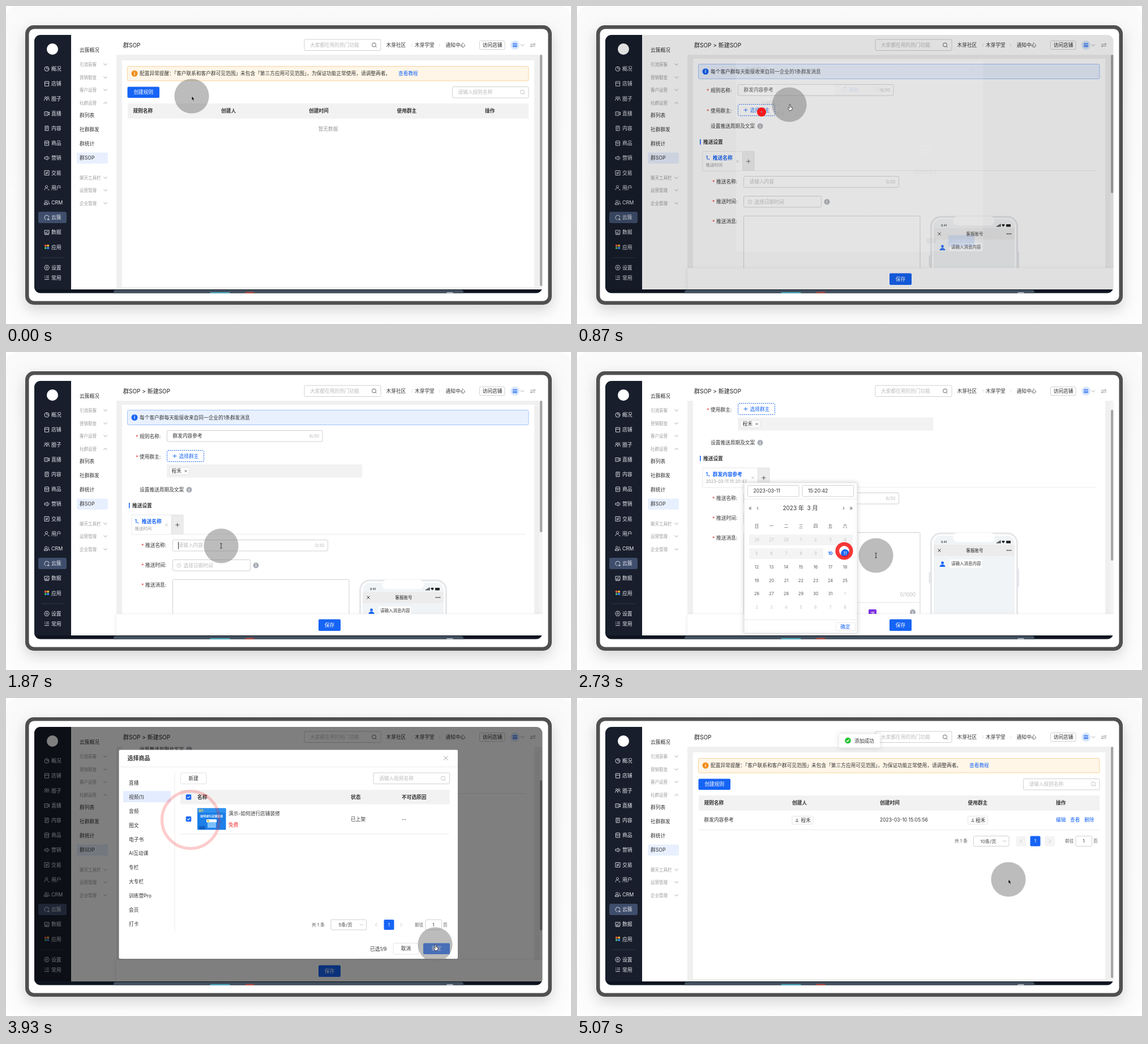
Recreate the animation shown at these times as an HTML page with a canvas. Size 998 by 561 pixels, loop 5270 ms.

```html
<!DOCTYPE html>
<html lang="zh-CN">
<head>
<meta charset="utf-8">
<title>群SOP</title>
<style>
html, body { margin: 0; width: 100%; height: 100%; overflow: hidden; background: #fff; }
canvas { display: block; width: 998px; height: 561px; }
</style>
</head>
<body>
<canvas id="stage"></canvas>
<script>
const W = 998, H = 561, LOOP = 5270, STEP = 1000 / 15, LAST = 76;
const INK = '#333', GREY = '#999', PALE = '#bbb', RULE = '#dcdcdc', BLUE = '#1664f5', RED = '#f02a2a';
const FONT = 'Inter, "Noto Sans CJK SC", "Noto Sans CJK", sans-serif';
const OWNER = '程禾', NAME = '群发内容参考', STAMP = '2023-03-11 15:20:42', VIDEO = '演示-如何进行店铺装修';

const canvas = document.getElementById('stage');
const c = canvas.getContext('2d');
const dpr = window.devicePixelRatio || 1;
canvas.width = W * dpr;
canvas.height = H * dpr;

// Motion tables: [step, value...]
const CURSOR = [
  [0, 328, 159], [3, 246, 156], [5, 246, 156], [8, 380, 150], [10, 380, 150], [12, 326, 187],
  [13, 375, 174], [15, 430, 190], [16, 430, 190], [19, 679, 414], [21, 679, 414], [26, 380, 342],
  [32, 380, 342], [36, 360, 293], [37, 360, 293], [39, 472, 351], [41, 528, 359], [45, 528, 359],
  [48, 322, 391], [49, 322, 391], [52, 326, 215], [53, 326, 215], [58, 758, 435], [61, 758, 435],
  [65, 579, 478], [68, 614, 338], [73, 740, 322], [76, 762, 320]];
const CLICKS = [[4, 246, 156], [12, 326, 187], [20, 679, 414], [39, 472, 351], [52, 326, 215], [60, 758, 435], [65, 579, 478]];
const SCROLL = [[33, 0], [35, 83], [45, 83], [47, 153], [62, 153], [64, 299]];
const THUMB = [[21, 86, 330], [22, 86, 318], [33, 86, 318], [35, 102, 368], [45, 102, 368], [47, 145, 410], [62, 145, 410], [64, 231, 462]];
const OWNER_SHADE = [[12, 0], [13, .24], [15, 1], [21, 1], [24, 0]];
const GOODS_SHADE = [[48, 0], [51, 1], [60, 1], [62, 0]];
const FADE = [[65, 0], [68, .88], [69, 1]];

function at(k, keys) {
  if (k <= keys[0][0]) return keys[0].slice(1);
  for (let i = 1; i < keys.length; i++) {
    const a = keys[i - 1], b = keys[i];
    if (k > b[0]) continue;
    const p = (k - a[0]) / (b[0] - a[0]), e = p * p * (3 - 2 * p);
    return a.slice(1).map((v, j) => v + (b[j + 1] - v) * e);
  }
  return keys[keys.length - 1].slice(1);
}
const typed = (k, from) => NAME.slice(0, Math.max(0, Math.min(6, (k - from) * 2)));

function txt(s, x, y, color = INK, size = 8.7, align = 'left', weight = 400) {
  c.font = `${weight} ${size}px ${FONT}`;
  c.textAlign = align;
  c.fillStyle = color;
  c.fillText(s, x, y + size * .37);
}
const mid = (s, x, y, color, size, weight) => txt(s, x, y, color, size, 'center', weight);
const bold = (s, x, y, color, size) => txt(s, x, y, color, size, 'left', 600);

function box(x, y, x2, y2, fill, stroke, r = 2, lw = .8) {
  c.beginPath();
  c.roundRect(x, y, x2 - x, y2 - y, r);
  if (fill) { c.fillStyle = fill; c.fill(); }
  if (stroke) { c.strokeStyle = stroke; c.lineWidth = lw; c.stroke(); }
}
function dot(x, y, r, fill) {
  c.beginPath();
  c.arc(x, y, r, 0, 7);
  c.fillStyle = fill;
  c.fill();
}
function path(d, x, y, color, lw = .9, fill, scale = 1) {
  c.save();
  c.translate(x, y);
  c.scale(scale, scale);
  const p = new Path2D(d);
  if (fill) { c.fillStyle = fill; c.fill(p); }
  if (color) { c.strokeStyle = color; c.lineWidth = lw; c.stroke(p); }
  c.restore();
}
const hline = (x, x2, y, color = '#e8e8e8') => path(`M${x} ${y}H${x2}`, 0, 0, color, .8);
const chevron = (x, y, up, color = GREY) => path(up ? 'M-3 1.5L0-1.5L3 1.5' : 'M-3-1.5L0 1.5L3-1.5', x, y, color);
const cross = (x, y, s, color = GREY) => path(`M${-s} ${-s}L${s} ${s}M${s} ${-s}L${-s} ${s}`, x, y, color);
const lens = (x, y, color = PALE) => path('M3-.5A3.5 3.5 0 1 1-4-.5A3.5 3.5 0 1 1 3-.5M2 2.2L4 4.2', x, y, color);
const person = (x, y, s, color) => path('M0-4a2.2 2.2 0 1 0 .1 0M-4.5 4.5C-4.5-.2 4.5-.2 4.5 4.5Z', x, y, null, 0, color, s);
function button(s, x, y, x2, y2, primary) {
  box(x, y, x2, y2, primary ? BLUE : '#fff', primary ? null : RULE);
  mid(s, (x + x2) / 2, (y + y2) / 2, primary ? '#fff' : INK);
}
function info(x, y, r, color) {
  dot(x, y, r, color);
  mid('i', x, y, '#fff', r * 1.4, 700);
}
function input(x, y, x2, y2, hint, value, count) {
  box(x, y, x2, y2, '#fff', '#c4c4c4');
  txt(value || hint, x + 10, (y + y2) / 2, value ? INK : PALE);
  if (count) txt(count, x2 - 6, (y + y2) / 2, PALE, 7.6, 'right');
}

const MENU = [
  ['概况', 'M4 0A4 4 0 1 1 0-4V0H4A4 4 0 0 0 0-4'],
  ['店铺', 'M-3.5-1V4H3.5V-1M-4-1L-3.5-4H3.5L4-1Z'],
  ['圈子', 'M-2-3.5a1.6 1.6 0 1 0 .1 0M2-3.5a1.6 1.6 0 1 0 .1 0M-4.5 3.5C-4.5-1 0-1 0 3.5C0-1 4.5-1 4.5 3.5'],
  ['直播', 'M-4-3H2V3.5H-4ZM2-1L4.5-2.5V2.5L2 1M-1-1V1.5'],
  ['内容', 'M-3-4H3V4H-3ZM-1.5-2H1.5M-1.5 0H1.5M-1.5 2H0'],
  ['商品', 'M-3.5-1V4H3.5V-1M-4-1L-3-4H3L4-1ZM-1.5 1H1.5'],
  ['营销', 'M-4-1.5H-2L1-3.5V3.5L-2 1.5H-4ZM3-2.5Q5 0 3 2.5'],
  ['交易', 'M-4-4H4V4H-4ZM-2 .5H2M-1 2.5V-1M1-2.5V1'],
  ['用户', 'M-.5-4a2 2 0 1 0 .1 0M-4 4C-4-.5 1-.5 1.5 2M2 3.5H4.5'],
  ['CRM', 'M-1.5-4a1.8 1.8 0 1 0 .1 0M-4.5 3.5V1H1.5V3.5ZM2-3.5Q4.5-2 2.5-.5M2.5 1H4.5V3.5'],
  ['云簇', 'M-1 4A4 4 0 1 1 4 0M1 4H4.5L2.8 1.5Z'],
  ['数据', 'M-4-3.5H4V2.5H-4ZM-2.5 0L-1 1L1-1.5L2.5 0M-4 4H4'],
  ['应用', ''],
  ['设置', 'M-4.5 0L-2.2-4H2.2L4.5 0L2.2 4H-2.2ZM1.5 0A1.5 1.5 0 1 1-1.5 0A1.5 1.5 0 1 1 1.5 0'],
  ['常用', 'M-1-3H4M-1 0H4M-4 3H4M-4-3H-2.5M-4 0H-2.5']];
const SUB = [
  ['云簇概况', 78], ['引流获客', 103, 1], ['营销裂变', 126, 1], ['客户运营', 148, 1], ['社群运营', 171, 2],
  ['群列表', 193], ['社群群发', 218], ['群统计', 243], ['群SOP', 268], ['聊天工具栏', 303, 1], ['运营管理', 325, 1], ['企业管理', 348, 1]];

function device() {
  c.fillStyle = '#fff';
  c.fillRect(0, 0, W, H);
  const g = c.createLinearGradient(0, 0, 0, H);
  g.addColorStop(0, '#fafafa');
  g.addColorStop(1, '#fdfdfd');
  box(0, 0, W, H, g, null, 20);
  c.save();
  c.shadowColor = 'rgba(0,0,0,.16)';
  c.shadowBlur = 24 * dpr;
  c.shadowOffsetY = 9 * dpr;
  box(34, 34, 964, 527, '#505050', null, 15);
  c.restore();
  box(40.5, 40.5, 957.5, 520.5, '#fff', null, 9);
}

function dock() {
  c.fillStyle = '#0e1520';
  c.fillRect(50, 500, 898, 7);
  box(190, 501, 808, 510, '#42505f', null, 4);
  box(360, 505, 396, 510, '#4cc3d9', null, 2);
  box(422, 504.5, 439, 510, '#c4483f', null, 3);
  box(778, 505, 790, 508, '#c8ced6', null, 2);
}

function sidebar() {
  c.fillStyle = '#181e2c';
  c.fillRect(50, 51, 65, 449);
  dot(82, 76, 10, '#fff');
  box(57, 363, 107, 383, '#3f4e6c', null, 3);
  MENU.forEach(([s, d], i) => {
    const y = i < 13 ? 111 + i * 26.2 : 461.5 + (i - 13) * 18;
    if (d) path(d, 72, y, '#e4e7ed');
    else ['#f4583e', '#f8b62d', '#3cb371', '#3d8bfd'].forEach((q, j) => dot(69.8 + j % 2 * 4.4, y - 2.7 + (j >> 1) * 4.4, 2, q));
    txt(s, 80, y, '#e4e7ed', 8.9);
  });
  hline(62, 103, 444, '#3a4150');
  c.fillStyle = '#fff';
  c.fillRect(115, 51, 80, 449);
  box(125, 258.5, 180, 278, '#e8f0ff');
  for (const [s, y, kind] of SUB) {
    txt(s, 130, y, kind ? GREY : INK, kind ? 7.5 : 8.7);
    if (kind) chevron(175.5, y, kind === 2);
  }
}

function header(title) {
  c.fillStyle = '#fff';
  c.fillRect(195, 51, 753, 35);
  txt(title, 207, 69, '#222', 10);
  box(527, 59, 662, 78.5, '#fff', '#c4c4c4');
  txt('大家都在用的热门功能', 537, 69, PALE);
  lens(650.5, 69, '#555');
  [['木芽社区', 671.5], ['木芽学堂', 722], ['通知中心', 776.5]].forEach(([s, x]) => txt(s, x, 69));
  path('M717 66V72M766 66V72', 0, 0, RULE);
  box(836.5, 61.5, 881, 76.5, '#fff', '#c4c4c4');
  mid('访问店铺', 859, 69, '#222');
  dot(899, 69, 8, '#dbe7fd');
  box(895, 65.5, 903, 72.5, '#5b92f5', null, 1);
  hline(895, 903, 68.5, '#fff');
  chevron(912, 69);
  path('M-4.5-1.5H4.5L2-3.5M4.5 1.5H-4.5L-2 3.5', 930.5, 69, '#777', .8);
}

function thumb(top, bottom) {
  c.fillStyle = '#f4f4f4';
  c.fillRect(942, 86, 6, bottom > 462 ? 414 : 376);
  box(943, top, 947.5, bottom, '#a6a6a6', null, 2);
}

function pager(x, y, size) {
  const goods = size === 5, sel = goods ? 34 : 33.5;
  txt('共 1 条', x, y, '#555', 7.7);
  box(x + sel, y - 9, x + sel + 62.5, y + 9, '#fff', '#c4c4c4');
  mid(size + '条/页', x + 59.5, y, '#444', 8.2);
  chevron(x + 88, y, false, PALE);
  const [p, n] = goods ? [114, 158] : [117.5, 168];
  if (!goods) for (const q of [p, n]) box(x + q - 9, y - 9, x + q + 9, y + 9, '#f4f4f5');
  path('M1.5-3L-1.5 0L1.5 3', x + p, y, PALE);
  path('M-1.5-3L1.5 0L-1.5 3', x + n, y, PALE);
  const one = x + (goods ? 136.5 : 142.5), go = x + (goods ? 182 : 195);
  box(one - 9, y - 9, one + 9, y + 9, BLUE);
  mid('1', one, y, '#fff', 8);
  txt('前往', go, y, '#555', 7.7);
  box(go + 19, y - 9, go + 47.5, y + 9, '#fff', '#c4c4c4');
  mid('1', go + 33, y, INK, 8);
  txt('页', go + 50, y, '#555', 7.7);
}

function list(done) {
  c.fillStyle = '#f0f0f0';
  c.fillRect(195, 86, 753, 414);
  c.fillStyle = '#fff';
  c.fillRect(205, 96, 728, 400);
  box(214.5, 106.5, 923, 132, '#fff6e8', '#f5c987');
  info(227, 119, 5.5, '#f08c16');
  txt('配置异常提醒：「客户联系和客户群可见范围」未包含「第三方应用可见范围」，为保证功能正常使用，请调整两者。', 236, 119);
  txt('查看教程', 693, 119, BLUE);
  button('创建规则', 214.5, 142.5, 271, 162, true);
  input(788.5, 142.5, 923, 162, '请输入规则名称');
  lens(912.5, 152);
  c.fillStyle = '#f2f2f2';
  c.fillRect(215, 172, 708, 26.5);
  const cols = [224.5, 380, 535, 690.5, 846];
  ['规则名称', '创建人', '创建时间', '使用群主', '操作'].forEach((s, i) => bold(s, cols[i], 185));
  if (!done) mid('暂无数据', 569, 217, GREY);
  else {
    txt(NAME, 224.5, 215);
    [[380, 417], [690.5, 725.5]].forEach(([x, x2]) => {
      box(x, 208.5, x2, 222.5, '#fff', RULE);
      person(x + 8.5, 215.5, .7, GREY);
      txt(OWNER, x2 - 21.5, 215.5);
    });
    txt('2023-03-10 15:05:56', 535, 215, INK, 8.5);
    ['编辑', '查看', '删除'].forEach((s, i) => txt(s, 846 + i * 25, 215, BLUE));
    hline(215, 923, 232.5);
    pager(667, 252.5, 10);
  }
  thumb(86, 494);
}

function label(s, x, y) {
  txt('*', x - 7, y + 1, RED);
  txt(s + ':', x, y);
}

function phone(y, k) {
  box(625.5, y, 777.5, y + 306, '#fff', '#e4e6e9', 17, 3);
  box(630, y + 4, 773, y + 302, '#f1f4f6', null, 13);
  c.fillStyle = '#ececec';
  c.fillRect(630, y + 20, 143, 20);
  box(664, y - 1, 738, y + 15, '#fff', null, 8);
  box(621.5, y + 68, 624, y + 88, '#e4e6e9');
  box(779, y + 62, 781, y + 95, '#e4e6e9');
  bold('9:41', 643, y + 15, INK, 5);
  for (let i = 0; i < 4; i++) box(741 + i * 2, y + 16 - i * 1.2, 742.4 + i * 2, y + 17.5, '#222', null, 0);
  path('M-3-1.5Q0-4 3-1.5L0 2Z', 753, y + 15.5, null, 0, '#222');
  box(758, y + 13, 766, y + 17.5, '#222', null, 1);
  cross(640, y + 30, 2.6, '#222');
  mid('客服账号', 702.5, y + 30, '#222', 7.6);
  for (let i = -1; i < 2; i++) dot(763 + i * 3.2, y + 30, 1, '#222');
  person(645.5, y + 54, 1.1, BLUE);
  box(658, y + 46, 715.5, y + 60.5, '#fff');
  txt(typed(k, 43) || '请输入消息内容', 661, y + 53, INK, 7.5);
  if (k >= 62) {
    person(645.5, y + 76, 1.1, BLUE);
    box(658, y + 68, 764, y + 115, '#fff');
    bold(VIDEO, 663, y + 76, INK, 7.5);
    txt('演示-如何进行店铺', 663, y + 92, GREY, 7.5);
    txt('装修', 663, y + 102, GREY, 7.5);
    box(735, y + 87, 760, y + 112, '#3d8be8');
  }
  hline(676, 726, y + 299, '#999');
}

function tools(y, k) {
  const kinds = [['店铺商品', '#f59a23'], ['图片', '#2f7df6'], ['链接', '#2f7df6'], ['文件', '#f5a623'], ['网页', '#3565f0'], ['小程序', '#7a2fe0']];
  kinds.forEach(([s, q], i) => {
    const x = 322 + i * 40;
    box(x - 7, y + 136, x + 7, y + 150, q);
    path('M-3 3L3-3M-3-1A3 3 0 1 1 2 3', x, y + 143, '#fff', 1);
    mid(s, x, y + 158, '#666', 7.8);
  });
  info(593, y + 141, 5, '#a9adb5');
  txt((k >= 62 ? 1 : 0) + '/9', 598, y + 158, GREY, 7.8, 'right');
  if (k < 62) return;
  box(303, y + 175, 598, y + 203, '#f6f7f9');
  box(313, y + 181, 327, y + 195, '#f59a23');
  txt(VIDEO, 332, y + 188);
  path('M-3 3L2-3L4-1L-1 4Z', 568, y + 188, BLUE);
  path('M-3-2V4H3V-2M-4-3H4M-1-4H1', 583, y + 188, BLUE);
}

function form(k) {
  const [scroll] = at(k, SCROLL), chosen = k >= 22;
  const name = typed(k, 8), push = typed(k, 30), msg = typed(k, 43), dated = k >= 40;
  c.save();
  c.beginPath();
  c.rect(195, 86, 753, 376);
  c.clip();
  c.fillStyle = '#f0f0f0';
  c.fillRect(195, 86, 753, 376);
  c.fillStyle = '#fff';
  c.fillRect(205, 93 - scroll, 728, 720);
  c.translate(0, -scroll);
  box(214.5, 102.5, 923, 128.5, '#e9f1ff', '#8db5f8');
  info(227, 115.5, 5.5, BLUE);
  txt('每个客户群每天能接收来自同一企业的1条群发消息', 236, 115.5);
  label('规则名称', 236, 148.5);
  input(284.5, 138.5, 559, 158, '请输入规则名称', name, name.length + '/30');
  label('使用群主', 236, 184.5);
  c.setLineDash([2, 1.5]);
  box(284.5, 173.5, 349.5, 193.5, '#fff', BLUE, 2, 1);
  c.setLineDash([]);
  path('M-3.5 0H3.5M0-3.5V3.5', 298, 183.5, BLUE);
  txt('选择群主', 305.5, 183.5, BLUE);
  if (chosen) {
    c.fillStyle = '#f2f2f2';
    c.fillRect(284, 198.5, 345, 23);
    box(289, 203.5, 323.5, 216.5, '#fff', RULE);
    txt(OWNER, 292.5, 210);
    cross(317.5, 210, 2, '#555');
  } else c.translate(0, -31);
  txt('设置推送周期及文案', 236, 243);
  info(323.5, 243, 5, '#a9adb5');
  box(217, 266, 218.6, 275.5, BLUE, null, 0);
  bold('推送设置', 223, 271);
  const full = push.length === 6, edge = full ? 319.5 : 292.5;
  hline(222, 918, 321.5);
  box(222, 287.5, edge, 322, '#fff', '#e4e4e4', 0);
  box(edge, 287.5, edge + 20.5, 321, '#ececec', '#dedede', 0);
  path('M-3.5 0H3.5M0-3.5V3.5', edge + 10.3, 305, '#444');
  bold('1、' + (full ? NAME : '推送名称'), 227.5, 299, BLUE);
  txt(dated ? STAMP : '推送时间', 227.5, 311, GREY, 7.4);
  cross(edge - 9, 305, 2.2, PALE);
  label('推送名称', 246, 341);
  input(294.5, 331.5, 568.5, 351, '请输入内容', push, push.length + '/30');
  if (k >= 27 && k < 34) path('M304.5 335V348', 0, 0, '#222');
  label('推送时间', 246, 376);
  box(294.5, 366.5, 431.5, 386, '#fff', '#c4c4c4');
  path('M3.5 0A3.5 3.5 0 1 1-3.5 0A3.5 3.5 0 1 1 3.5 0M0-2V.3H1.6', 305.5, 376.5, PALE, .7);
  txt(dated ? STAMP : '选择日期时间', 313.5, 376.5, dated ? INK : PALE);
  info(441.5, 376.5, 5, '#a9adb5');
  label('推送消息', 246, 411);
  box(294.5, 401.5, 606, k >= 62 ? 609 : 576, '#fff', '#c4c4c4');
  if (msg) txt(msg, 303, 412);
  dot(312, 506, 4.2, '#777');
  path('M-2 .5Q0 3 2 .5', 312, 505.5, '#fff');
  txt('表情', 320, 506, '#666', 7.8);
  txt(msg.length + '/1000', 598, 511, PALE, 8.4, 'right');
  hline(294.5, 606, 525, RULE);
  tools(401, k);
  phone(403, k);
  c.restore();
  const [fade] = at(k, FADE);
  c.fillStyle = `rgba(255,255,255,${fade})`;
  c.fillRect(217, 51, 705, 35);
  c.fillRect(205, 86, 728, 376);
  thumb(...at(k, THUMB));
  c.save();
  c.shadowColor = 'rgba(0,0,0,.12)';
  c.shadowBlur = 5 * dpr;
  c.fillStyle = '#fff';
  c.fillRect(195, 462.5, 753, 37.5);
  c.restore();
  button('保存', 552, 471.5, 591, 492, true);
  if (fade > .5) runner(k);
}

function runner(k) {
  const bob = (k - 68) % 2 * 1.5;
  path('M544 140.5H557M552 129H561M585 124H593', bob, 0, '#8fb0f0', 1.2);
  path('M11 0A11 18 0 1 1-11 0A11 18 0 1 1 11 0', 569.5, 120 + bob, '#3c4254', 1, '#fff');
}

function picker(picked) {
  c.save();
  c.shadowColor = 'rgba(0,0,0,.18)';
  c.shadowBlur = 7 * dpr;
  box(295, 230.5, 495, 496, '#fff', '#e0e0e0');
  c.restore();
  input(301.5, 235.5, 392, 255, '选择日期', picked && '2023-03-11');
  input(398, 235.5, 488.5, 255, '选择时间', picked && '15:20:42');
  hline(295, 495, 259.5);
  mid('2023 年  3 月', 394.5, 275.5, INK, 10);
  txt('«   ‹', 303, 275, '#555', 10);
  txt('›   »', 487, 275, '#555', 10, 'right');
  box(304, 322, 487, 341, '#f4f4f4', null, 0);
  box(304, 346, 435, 365, '#f4f4f4', null, 0);
  for (let i = 0; i < 7; i++) mid('日一二三四五六'[i], 317.5 + i * 26, 307, '#555', 7.5);
  for (let i = 0; i < 42; i++) {
    const x = 317.5 + i % 7 * 26, y = 331.5 + Math.floor(i / 7) * 23.8, d = i - 2;
    const out = d < 1 || d > 31, sel = d === 11 && picked;
    if (sel) dot(x, y, 7.3, BLUE);
    const color = sel ? '#fff' : d === 10 ? BLUE : out || d < 10 ? '#c4c4c4' : '#555';
    mid(d < 1 ? d + 28 : d > 31 ? d - 31 : d, x, y, color, 7.4, d === 10 ? 700 : 400);
  }
  hline(295, 495, 472.5);
  box(457, 477.5, 491.5, 491.5, '#fff', '#e4e4e4');
  mid('确定', 474, 484.5, BLUE);
}

function ownerModal(k) {
  box(281, 97, 717.5, 433, '#fff');
  txt('选择群主', 296, 112, INK, 10);
  cross(697, 112, 3.5);
  box(296, 138, 457, 157, '#fff', '#c4c4c4');
  txt('请输入员工名称', 306, 148, PALE);
  path('M4 0A4 4 0 1 1 2-3.5M2-5.5V-3H-.5', 473, 147.5, BLUE);
  txt('刷新', 480.5, 147.5, BLUE);
  txt('已选', 519, 147.5, GREY);
  path('M508 135V400', 0, 0, '#e8e8e8');
  txt('全部员工', 325, 172);
  if (k >= 15) box(296, 181, 505, 200, '#eef4ff');
  person(338, 190.5, 1.1, '#8fa8d0');
  txt(OWNER, 350, 190.5);
  if (k >= 16) {
    person(528, 172, 1, '#8fa8d0');
    txt(OWNER, 538, 172);
  } else {
    box(601, 234, 633, 273, '#e3e6ec', null, 4);
    path('M-8-7H8M-8 0H8M-8 7H4', 617, 254, '#fff', 2);
    mid('请选择员工', 615.5, 293, GREY);
  }
  txt('取消', 617, 414.5);
  button('确定', 656, 404.5, 702, 424.5, true);
}

function tick(x, y, on) {
  box(x - 4.3, y - 4.3, x + 4.3, y + 4.3, on ? BLUE : '#fff', on ? BLUE : '#c4c4c4', 1);
  if (on) path('M-2.2 0L-.6 1.7L2.4-1.7', x, y, '#fff', 1.1);
}

function goodsModal(k) {
  const on = k >= 52;
  box(199.5, 91.5, 798, 460, '#fff');
  bold('选择商品', 214.5, 106, INK, 10);
  cross(777, 106, 3.8);
  hline(199.5, 798, 121.5);
  box(207, 164, 291, 184, '#e4edff', null, 0);
  ['直播', '视频(1)', '音频', '图文', '电子书', 'AI互动课', '专栏', '大专栏', '训练营Pro', '会员', '打卡']
    .forEach((s, i) => txt(s, 217, 149.5 + i * 24.95));
  path('M298 131V412', 0, 0, '#e8e8e8');
  button('新建', 308.5, 132, 354, 151.5);
  input(649, 132, 783.5, 151.5, '请输入视频名称');
  lens(772.5, 142);
  c.fillStyle = '#f2f2f2';
  c.fillRect(308, 162, 475.5, 25.5);
  tick(322.5, 174.8, on);
  bold('名称', 338, 174.8);
  bold('状态', 609, 174.8);
  bold('不可选原因', 699, 174.8);
  tick(322.5, 213.5, on);
  box(338, 194.5, 388.5, 232.5, '#1c7fe8', null, 1);
  box(338, 194.5, 388.5, 202, '#2f92f0', null, 1);
  bold('演示', 340, 198.5, '#ffd94a', 4.5);
  mid('如何进行店铺装修', 363.2, 208.5, '#fff', 5, 700);
  box(354, 214, 372, 219.5, '#fff', null, 1);
  box(356, 219.5, 371, 229, '#7cc0ff', null, 1);
  dot(357, 216.8, 1.8, '#f5b52e');
  box(341, 226, 352, 232, '#1260c4', null, 0);
  txt(VIDEO, 393, 204);
  txt('免费', 393, 223.5, RED);
  txt('已上架', 609, 214);
  txt('--', 699, 214);
  hline(308, 783.5, 240);
  pager(540, 400, 5);
  txt(`已选${on ? 1 : 0}/9`, 643, 442.5);
  button('取消', 684, 432.5, 729, 452, false);
  button('确定', 737, 432.5, 784, 452, true);
}

function modal(k, keys, draw) {
  const [a] = at(k, keys);
  if (!a) return;
  c.fillStyle = `rgba(0,0,0,${a * .5})`;
  c.fillRect(50, 51, 898, 449);
  c.save();
  c.globalAlpha = a ** 1.5;
  draw(k);
  c.restore();
}

function toast() {
  c.save();
  c.shadowColor = 'rgba(0,0,0,.16)';
  c.shadowBlur = 9 * dpr;
  box(463, 63.5, 535, 87.5, '#fff');
  c.restore();
  dot(478.5, 75, 5.3, '#22c52e');
  path('M-2.5 0L-.7 1.9L2.6-1.8', 478.5, 75, '#fff', 1.2);
  txt('添加成功', 490, 75.5);
}

function pointer(k) {
  const [x, y] = at(k, CURSOR);
  dot(x, y, 30.6, 'rgba(122,122,122,.5)');
  if (k > 6 && k < 12 || k > 24 && k < 36 || k > 39 && k < 47)
    path('M-1.6-4.5Q0-4.5 0-3Q0-4.5 1.6-4.5M0-3V3M-1.6 4.5Q0 4.5 0 3Q0 4.5 1.6 4.5', x, y, '#222', .9);
  else if (k > 3 && k < 65)
    path('M-1 0V-5Q0-6 1-5V-1L4 0V3L2.5 5.5H-1L-3.5 1.5L-2.5 .5L-1 2Z', x + 1, y + 5, '#222', .8, '#fff');
  else
    path('M0 0V7.5L1.7 6L3 9L4.4 8.3L3.2 5.5H5.5Z', x, y, '#fff', .5, '#111');
}

function ripples(k) {
  for (const [k0, x, y] of CLICKS) {
    const a = k - k0;
    if (a < 1 || a > 7) continue;
    const outer = .6 + 7.5 * a, w = 7.3 - a * .3;
    c.beginPath();
    c.arc(x, y, outer - w / 2, 0, 7);
    c.strokeStyle = `rgba(245,25,25,${1 - (a - 1) * .13})`;
    c.lineWidth = w;
    c.stroke();
  }
}

function draw(k) {
  c.setTransform(dpr, 0, 0, dpr, 0, 0);
  device();
  c.save();
  c.beginPath();
  c.roundRect(50, 51, 897.5, 455.5, 11);
  c.clip();
  dock();
  sidebar();
  const editing = k >= 6 && k < 71;
  header(editing ? '群SOP > 新建SOP' : '群SOP');
  if (editing) form(k); else list(k >= 71);
  if (k >= 36 && k < 42) picker(k >= 40);
  modal(k, OWNER_SHADE, ownerModal);
  modal(k, GOODS_SHADE, goodsModal);
  if (k >= 72) toast();
  pointer(k);
  ripples(k);
  c.restore();
}

const start = performance.now();
let shown = -1;
function loop() {
  const t = (performance.now() - start) % LOOP;
  const k = Math.min(LAST, Math.floor((t + 4) / STEP));
  if (k !== shown) draw(shown = k);
  requestAnimationFrame(loop);
}
loop();
</script>
</body>
</html>
```
